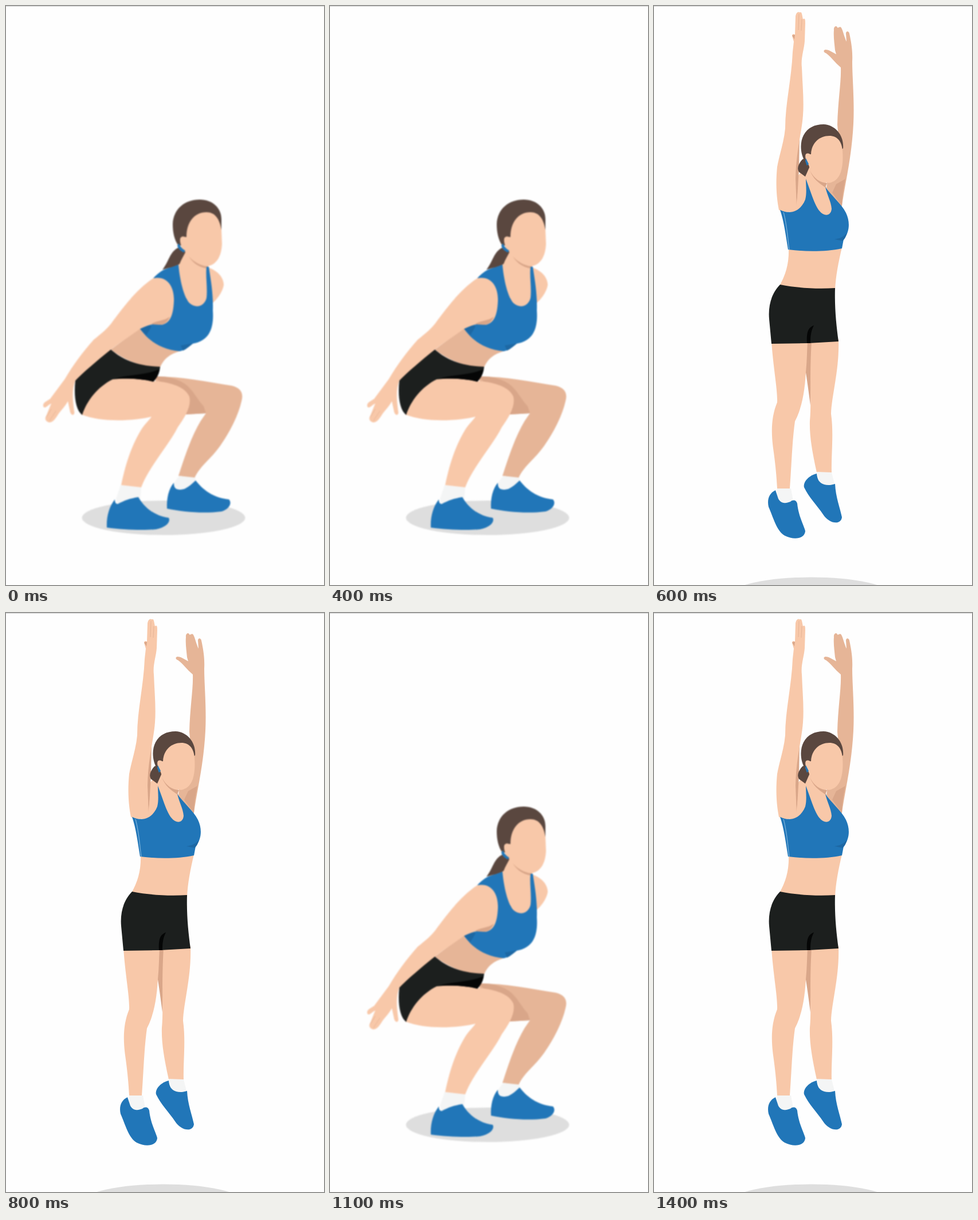
An HTML page that plays this animation: 555 px wide and 1008 px high, repeating every 1.5 s.

```html
<!DOCTYPE html>
<html lang="en">
<head>
<meta charset="utf-8">
<title>Squat jump</title>
<style>
html, body { margin: 0; width: 100%; height: 100%; overflow: hidden; background: #fefefe; }
svg { display: block; width: 100%; height: 100%; }
#squat { filter: blur(.9px); }
#jump { filter: blur(.6px); }
.skin { fill: #f8c8a9; }
.shade { fill: #e6b597; }
.deep { fill: #d9a689; }
.blue { fill: #2176b8; }
.navy { fill: #1d68a4; }
.hair { fill: #5a473f; }
.cloth { fill: #1c1f1e; }
.black { fill: #050606; }
.sock { fill: #f4f5f5; }
.floor { fill: #dedede; }
</style>
</head>
<body>
<svg viewBox="0 0 555 1008" preserveAspectRatio="none">
  <rect width="555" height="1008" fill="#fefefe"/>

  <g id="squat">
    <ellipse class="floor" cx="275" cy="891" rx="142.5" ry="30"/>
    <!-- far leg -->
    <path class="shade" d="M258 645C300 644 350 654 394 661C410 665 415 674 411 688C404 720 379 764 356 787C341 802 333 812 329 822L301 818C312 784 324 748 340 722L349 709L300 712L262 655Z"/>
    <path class="deep" d="M258 645C281 644 298 649 311 657C326 667 333 684 345 697L349 709L314 711L300 680Z"/>
    <path class="sock" d="M302 818L330 821L332 829C322 839 308 843 296 840L293 831Z"/>
    <path class="blue" d="M293 830C284 840 280 857 281 875C310 881 345 884 376 880C390 876 395 865 389 859C368 857 347 847 331 826C320 836 311 845 298 841C294 839 293 835 293 830Z"/>
    <!-- near leg -->
    <path class="sock" d="M200 834L236 838L234 860L195 868L192 858Z"/>
    <path class="blue" d="M190 859C180 871 175 890 176 908C205 912 240 913 262 911C279 908 288 898 284 891C262 888 243 876 231 855C217 857 206 861 195 867C191 867 190 863 190 859Z"/>
    <path class="skin" d="M131 711C138 688 160 660 186 642L258 642L258 653C290 655 313 664 320 680C324 697 312 716 300 733C284 765 250 801 236 838L201 834C208 800 218 768 234 741C240 730 249 722 254 715C225 722 168 726 131 711Z"/>
    <!-- waist and shorts -->
    <path class="shade" d="M240 556L183 598C205 616 240 630 269 629C275 615 285 606 306 600Z"/>
    <path class="cloth" d="M183 598C199 612 224 627 269 628C268 640 263 648 257 654C235 648 205 648 186 650C160 663 141 687 133 712C122 704 118 680 121 652C137 632 163 610 183 598Z"/>
    <path class="black" d="M189 649C212 641 246 643 268 632C267 641 263 648 257 654C235 648 205 648 189 649Z"/>
    <!-- far shoulder, chest, neck -->
    <path class="skin" d="M352 455C371 461 380 474 380 486C377 500 369 509 360 518Z"/>
    <path class="skin" d="M306 418L294 452L316 526L350 526L353 452Z"/>
    <path class="deep" d="M318 434C328 446 341 452 353 452L351 457C337 455 325 447 318 434Z"/>
    <!-- top -->
    <path class="blue" d="M257 474C264 466 272 460 281 457L301 450C303 475 310 506 320 517C332 528 347 522 350 508C352 490 348 470 350 454L354 454C357 475 362 500 361 530C363 560 356 583 325 588C317 593 312 600 303 601C270 598 248 582 234 562L250 520Z"/>
    <path class="navy" d="M234 562L248 554L254 558L245 573Z"/>
    <path class="navy" d="M305 591C313 590 320 588 327 587C321 592 315 597 309 600Z"/>
    <!-- near arm -->
    <path class="skin" d="M257 474C284 469 294 492 293 514C292 537 287 552 272 555C259 551 246 556 234 562C215 576 198 586 183 598C158 618 136 637 121 652C115 667 116 684 119 705C121 713 114 714 112 707L108 688C104 696 96 704 91 711C86 719 82 725 75 725C69 723 67 719 70 714L79 692C74 694 71 699 67 699C63 697 65 691 69 689L77 684C85 673 95 660 103 649C117 625 135 601 153 581C168 569 178 561 187 548C205 524 228 493 257 474Z"/>
    <path class="deep" d="M253 554C262 547 275 549 286 541C282 550 276 555 268 555Z"/>
    <path d="M70 716L79 702M76 722L87 705" stroke="#e6b597" fill="none"/>
    <!-- head -->
    <path class="hair" d="M302 420C285 428 285 444 273 459C286 455 294 454 303 449C306 441 310 435 314 427Z"/>
    <path class="hair" d="M300 416C294 407 291 395 291 380C292 353 312 337 338 337C361 337 376 352 376 371L376 390L346 401L314 419Z"/>
    <path class="skin" d="M312 427C305 421 302 406 305 403C309 399 312 403 315 402C315 377 328 359 350 359C365 359 373 371 376 390L377 414C376 438 366 451 351 453C336 452 320 440 312 427Z"/>
    <path class="blue" d="M302 413C304 419 308 423 313 426L310 429C304 426 300 422 299 417Z"/>
  </g>

  <g id="jump">
    <ellipse class="floor" cx="274" cy="1025" rx="139" ry="30.5"/>
    <!-- far arm -->
    <path class="shade" d="M328 348C333 310 345 265 348 205C350 165 346 125 346 97C347 78 344 62 341 48C340 43 335 43 335 48L336 62C332 54 330 43 327 38C324 34 321 40 320 37C318 33 313 36 314 42C313 54 315 66 316 77L318 84C312 81 306 76 299 76C295 77 296 81 300 82C309 88 315 98 326 107C327 132 321 165 320 207L324 250L302 302L301 320L326 350Z"/>
    <path class="deep" d="M328 348C328 333 330 321 334 301L318 310L311 325Z"/>
    <!-- legs -->
    <path class="deep" d="M262 580L277 580L273 695C270 673 267 650 264 632Z"/>
    <path class="skin" d="M205 583C208 630 216 668 215 690C205 714 204 740 208 770C212 798 214 820 215 840L237 840C240 800 241 758 246 723C258 700 263 672 265 638C267 618 267 600 268 583Z"/>
    <path class="skin" d="M275 583L322 580C324 632 310 678 309 710C314 746 309 780 310 814L284 812C277 780 271 750 272 722C275 692 271 650 275 583Z"/>
    <!-- feet -->
    <path class="sock" d="M215 840L239 840L243 862L219 867L214 855Z"/>
    <path class="blue" d="M212 843C201 848 197 859 200 872C208 890 214 914 228 922C244 930 263 928 264 914C262 905 252 888 250 866C248 860 243 859 238 863C230 866 222 867 217 858Z"/>
    <path class="sock" d="M284 811L310 812L315 832C307 839 298 836 290 832Z"/>
    <path class="blue" d="M284 814C271 817 260 828 262 838C270 855 285 870 295 885C305 901 326 905 328 890C325 875 317 855 316 832C310 834 303 835 297 833C288 830 285 824 284 814Z"/>
    <!-- torso -->
    <path class="skin" d="M235 420C236 447 231 466 218 489L316 495C317 470 322 446 328 420Z"/>
    <path class="cloth" d="M220 485C205 500 199 522 201 545L205 588L270 587L322 584C318 555 315 525 316 491C285 493 250 491 220 485Z"/>
    <path class="black" d="M279 556C270 560 266 565 267 587L273 587C273 574 274 566 279 556Z"/>
    <path class="skin" d="M268 275L248 300L236 368L306 372L318 350L300 314L300 295Z"/>
    <path class="deep" d="M272 286C279 301 291 308 302 308L299 316C288 308 278 302 272 286Z"/>
    <!-- near arm -->
    <path class="deep" d="M250 230L254 225L253 285L249 350L240 355Z"/>
    <path class="skin" d="M255 292L248 350L240 359L255 354L267 320L266 300Z"/>
    <path class="skin" d="M218 355C214 335 212 310 215 280C219 258 227 236 229 213C229 170 240 128 242 80L244 62L241 52C242 47 244 49 246 50L247 18C248 12 251 9 254 11L257 11C259 15 259 20 260 23C264 20 264 25 264 30L263 61C262 76 256 90 258 107C259 135 262 165 260 190C258 220 248 252 247 300L249 351C240 360 230 361 218 355Z"/>
    <path d="M253 14L252 42M258 23L257 43" stroke="#e6b597" fill="none"/>
    <path class="deep" d="M241 51L246 50L245 58Z"/>
    <!-- top -->
    <path class="blue" d="M265 301C273 321 280 347 289 357C297 367 309 366 310 353C309 340 302 329 299 315C309 330 327 344 335 360C343 377 341 394 331 406L328 422C300 428 265 428 234 424C230 400 227 375 220 355C239 364 256 357 264 337C267 325 265 312 265 301Z"/>
    <path class="navy" d="M315 406C324 405 331 402 337 395C335 402 332 407 329 409Z"/>
    <path d="M226 359C232 380 233 402 236 424" stroke="#75afd9" stroke-width="1.3" fill="none"/>
    <!-- head -->
    <path class="hair" d="M259 267C252 275 249 282 253 289L264 297L272 279L266 264Z"/>
    <path class="hair" d="M261 266C255 253 255 236 261 225C268 212 280 206 296 206C317 207 332 226 330 248L300 262L272 272Z"/>
    <path class="skin" d="M270 277C265 271 262 259 266 257C270 255 272 259 274 258C275 238 289 226 306 226C320 226 328 236 329 252C331 282 326 304 306 308C291 308 274 292 270 277Z"/>
    <path class="blue" d="M265 265L270 275L267 278L264 270Z"/>
  </g>

  <rect width="555" height="1" fill="#cfcfcf"/>
</svg>
<script>
const LOOP = 1500;
const squat = document.getElementById('squat');
const jump = document.getElementById('jump');
const start = performance.now();

function draw(ms) {
  const t = ms % LOOP;
  const up = (t >= 500 && t < 900) || t >= 1200;
  squat.style.display = up ? 'none' : '';
  jump.style.display = up ? '' : 'none';
}

function tick(now) {
  draw(Math.max(0, now - start));
  requestAnimationFrame(tick);
}

draw(0);
requestAnimationFrame(tick);
</script>
</body>
</html>
```
